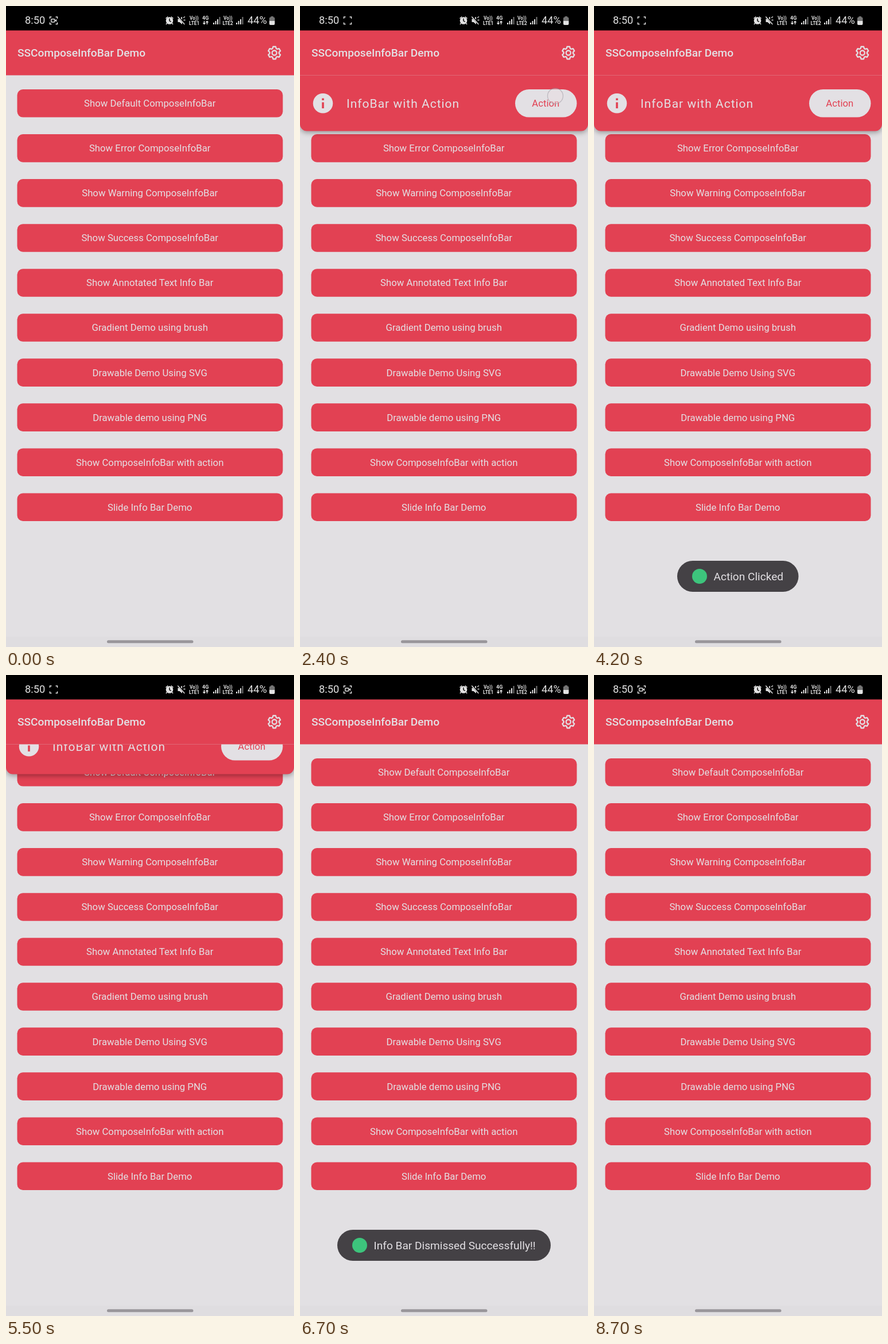
Write an HTML page that moves like this. It is 502 px wide and 1115 px high and loops after 9100 ms.

```html
<!DOCTYPE html>
<html lang="en">
<head>
<meta charset="utf-8">
<title>Info bar demo</title>
<style>
  html, body { margin: 0; width: 100%; height: 100%; overflow: hidden; background: #e2e0e3; }
  svg { display: block; width: 100vw; height: 100vh; font-family: Roboto, "Noto Sans", sans-serif; }
  .red { fill: #e24153; }
  .pale { fill: #e3e0e4; }
  .label { font-size: 16.75px; text-anchor: middle; }
  .toast { font-size: 19.1px; }
  .status { fill: #e2e2e2; font-size: 18.3px; }
  .tiny { font-size: 8.3px; font-weight: 700; }
  .line { fill: none; stroke: #e2e2e2; stroke-width: 1.5; }
  #bar { filter: drop-shadow(0 3px 4px rgba(0, 0, 0, .32)); }
  .touch { fill: rgba(232, 222, 227, .45); stroke: rgba(130, 130, 140, .4); stroke-width: 1.3; }
</style>
</head>
<body>
<svg viewBox="0 0 502 1115" preserveAspectRatio="none">
  <defs>
    <clipPath id="below"><rect y="120.5" width="502" height="995"/></clipPath>
    <clipPath id="pressed"><rect x="19.5" y="769.4" width="463" height="48.6" rx="10"/></clipPath>
    <g id="signal">
      <path d="M0 32v-3h2v3zM3.5 32v-6h2v6zM7 32v-9h2v9z" fill="#e2e2e2"/>
      <path d="M10.5 32V19h2v13z" fill="#777"/>
    </g>
  </defs>
  <rect width="502" height="1115" fill="#e2e0e3"/>
  <rect y="1097" width="502" height="18" fill="#dfdde0"/>
  <rect x="176" y="1103.3" width="150.5" height="5" rx="2.5" fill="#99969b"/>

  <g id="buttons"></g>
  <g clip-path="url(#pressed)"><circle id="ripple" cy="794" fill="#fff"/></g>

  <g clip-path="url(#below)">
    <g id="bar">
      <path class="red" d="M0 110H502V205.500a12 12 0 0 1-12 12H12a12 12 0 0 1-12-12z"/>
      <circle class="pale" cx="40" cy="169.300" r="17.300"/>
      <path class="red" d="M38.200 160.500h3.600v3.600h-3.600zM38.200 167.500h3.600v10.600h-3.600z"/>
      <text class="pale" x="81" y="176.500" font-size="21" letter-spacing="1">InfoBar with Action</text>
      <rect class="pale" x="375" y="145" width="107.500" height="48.600" rx="24.300"/>
      <text class="red label" x="428.300" y="175.200">Action</text>
    </g>
  </g>

  <rect class="red" y="42" width="502" height="78.500"/>
  <text class="pale" x="20" y="87.700" font-size="19.150" font-weight="500">SSComposeInfoBar Demo</text>
  <g fill="none" stroke="#e3e0e4" stroke-width="2.300" stroke-linejoin="round" transform="translate(467.800 81.500)">
    <path id="gear"/>
    <circle r="4"/>
  </g>

  <rect width="502" height="42.500"/>
  <text class="status" x="33" y="31.400">8:50</text>
  <path class="line" d="M76.500 22v-3h3M86.500 19h3v3M89.500 28.500v3h-3M79.500 31.500h-3v-3"/>
  <g id="camera">
    <rect class="line" x="78.800" y="22.700" width="6" height="5.300" rx="1" stroke-width="1.300"/>
    <path class="status" d="M85 25.300l3.200-2.500v5z"/>
  </g>
  <circle class="status" cx="285" cy="25.500" r="6.300"/>
  <path class="line" d="M278.500 21.800l3.800-3.300M291.500 21.800l-3.800-3.300M280.500 30l-1.500 2M289.500 30l1.500 2"/>
  <path d="M285 21.800v4l2.800 1.700" fill="none" stroke="#000" stroke-width="1.400"/>
  <path class="status" d="M299.500 22.500h3l4.500-4v13.500l-4.500-4h-3z"/>
  <path d="M299.300 17.300l12 14" stroke="#000" stroke-width="3.200"/>
  <path class="line" d="M299.300 18.500l12 13.500M309 20.500l3-2M309.500 24.500h3"/>
  <g class="status tiny">
    <text class="tiny" x="320" y="24">Vo))</text><text class="tiny" x="319" y="32.600">LTE1</text>
    <text class="tiny" x="379" y="24">Vo))</text><text class="tiny" x="377.500" y="32.600">LTE2</text>
    <text x="342" y="24.300" font-size="9" style="font-size:9px">4G</text>
  </g>
  <path class="line" stroke-width="1.200" d="M345.500 26v5.500m-2-2l2 2 2-2M350.500 32v-5.500m-2 2l2-2 2 2"/>
  <use href="#signal" x="361"/>
  <use href="#signal" x="401"/>
  <text class="status" x="421" y="31.400">44%</text>
  <path d="M461.500 18h4.500v1.500h.5a2 2 0 0 1 2 2V26h-9.500v-4.500a2 2 0 0 1 2-2h.5z" fill="#747474"/>
  <path class="status" d="M459 26h9.500v5a2 2 0 0 1-2 2H461a2 2 0 0 1-2-2z"/>

  <g id="toasts"></g>
  <circle id="tapButton" class="touch" cx="398" cy="807.500" r="13"/>
  <circle id="tapAction" class="touch" cx="445" cy="156.500" r="13.500"/>
</svg>
<script>
const LOOP = 9100, STEP = 100;
const $ = id => document.getElementById(id);
const clamp = x => Math.min(1, Math.max(0, x));
const ramp = (t, start, length) => clamp((t - start) / length);
const mix = (a, b, p) => a + (b - a) * p;

// cubic-bezier(.4, 0, .2, 1), solved by bisection
function ease(x) {
  let low = 0, high = 1, s;
  for (let i = 0; i < 20; i++) {
    s = (low + high) / 2;
    const at = 1.2 * s * (1 - s) ** 2 + .6 * s * s * (1 - s) + s ** 3;
    if (at < x) low = s; else high = s;
  }
  return s * s * (3 - 2 * s);
}

const labels = [
  "Show Default ComposeInfoBar", "Show Error ComposeInfoBar", "Show Warning ComposeInfoBar",
  "Show Success ComposeInfoBar", "Show Annotated Text Info Bar", "Gradient Demo using brush",
  "Drawable Demo Using SVG", "Drawable demo using PNG", "Show ComposeInfoBar with action",
  "Slide Info Bar Demo"
];
$("buttons").innerHTML = labels.map((label, i) => {
  const y = 145 + 78.05 * i;
  return `<rect class="red" x="19.5" y="${y}" width="463" height="48.6" rx="10"/>
    <text class="pale label" x="250.7" y="${y + 30.2}">${label}</text>`;
}).join("");

const toasts = [
  { text: "Action Clicked", x: 145, width: 211.5, show: 2600, hide: 4800 },
  { text: "Info Bar Dismissed Successfully!!", x: 65, width: 372, show: 5850, hide: 8050 }
];
$("toasts").innerHTML = toasts.map(({ text, x, width }) => `<g>
  <rect x="${x}" y="965" width="${width}" height="54" rx="27" fill="#444145"/>
  <circle cx="${x + 39}" cy="992" r="13" fill="#3dc47c"/>
  <text class="pale toast" x="${x + 63.5}" y="999.300">${text}</text></g>`).join("");

const gearPoints = [];
for (let tooth = 0; tooth < 6; tooth++) {
  for (const [offset, radius] of [[-23, 8.2], [-12, 11], [12, 11], [23, 8.2]]) {
    const angle = (tooth * 60 - 90 + offset) * Math.PI / 180;
    gearPoints.push(`${radius * Math.cos(angle)} ${radius * Math.sin(angle)}`);
  }
}
$("gear").setAttribute("d", `M${gearPoints.join("L")}z`);

function draw(t) {
  const blink = Math.floor((t - 200) / 500);
  $("camera").setAttribute("opacity", Math.abs(blink % 2));

  const shown = ease(ramp(t, 1333, 500)) - ease(ramp(t, 5333, 500));
  $("bar").setAttribute("transform", `translate(0 ${-98 * (1 - shown)})`);
  $("bar").style.display = shown > .001 ? "" : "none";

  const spread = ramp(t, 1100, 400);
  $("ripple").setAttribute("cx", mix(398, 251, spread));
  $("ripple").setAttribute("r", mix(110, 216, spread));
  $("ripple").setAttribute("opacity", t < 1100 ? 0 : .1 * (1 - ramp(t, 1500, 300)));

  $("tapButton").setAttribute("opacity", t < 1100 ? 0 : 1 - ramp(t, 1400, 200) * .9 - (t >= 1600 ? .1 : 0));
  $("tapAction").setAttribute("opacity", t >= 2400 && t < 2600 ? 1 : 0);

  toasts.forEach(({ show, hide }, i) => {
    const alpha = ease(ramp(t, show, 450)) - ease(ramp(t, hide, 500));
    const scale = mix(.9, 1, alpha);
    const group = $("toasts").children[i];
    group.setAttribute("opacity", alpha);
    group.setAttribute("transform", `translate(251 992) scale(${scale}) translate(-251 -992)`);
  });
}

function tick() {
  const t = performance.now() % LOOP;
  draw(t - t % STEP);
  requestAnimationFrame(tick);
}
tick();
</script>
</body>
</html>
```
